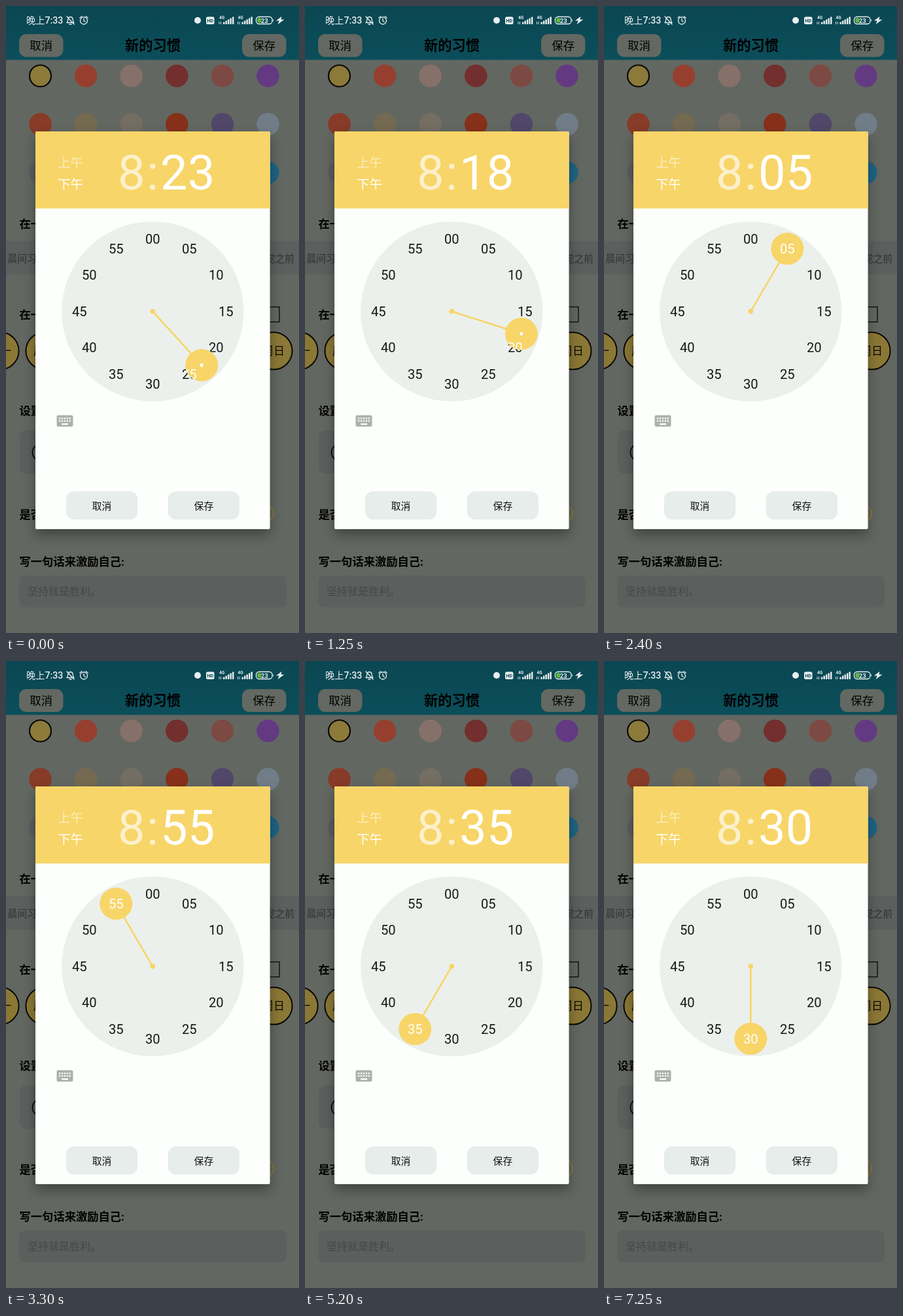
Recreate the animation shown at these times as an HTML page. Size 448 px wide and 960 px high, loop 7300 ms.

```html
<!DOCTYPE html>
<html lang="zh-CN">
<head>
<meta charset="utf-8">
<title>时间选择</title>
<style>
  html, body { margin: 0; width: 100%; height: 100%; overflow: hidden; background: #636761; }
  svg { display: block; width: 448px; height: 960px; }
  text { font-family: Roboto, "Noto Sans CJK SC", "Noto Sans CJK", sans-serif; }
  .mid { text-anchor: middle; }
  .head { font-size: 17.3px; font-weight: 700; }
  .btn { font-size: 17.4px; }
  .action { font-size: 14.8px; font-weight: 500; fill: #111; }
  .chip { font-size: 14.7px; fill: #303330; }
  .day circle { fill: #8b7836; stroke: #080806; stroke-width: 2; }
  .day text { font-size: 17px; fill: #0c0b06; }
  .big { font-size: 74px; fill: #fff; }
  .nums { font-size: 20.2px; text-anchor: middle; }
  .panel { fill: #5b5f5d; }
  #dialog { filter: drop-shadow(0 9px 9px rgba(0, 0, 0, .34)); }
</style>
</head>
<body>
<svg viewBox="0 0 448 960">
  <defs>
    <linearGradient id="bar" x2="0" y2="1">
      <stop stop-color="#0a4752"/>
      <stop offset="1" stop-color="#0b4e5a"/>
    </linearGradient>
    <clipPath id="knobClip"><ellipse class="knob" rx="25" ry="24.6"/></clipPath>
  </defs>

  <rect width="448" height="960" fill="#636761"/>
  <g id="swatches"></g>
  <rect width="448" height="82.5" fill="url(#bar)"/>

  <!-- status bar -->
  <g fill="#e9eff0">
    <text x="31" y="27.2" font-size="14.2" font-weight="500">晚上7:33</text>
    <g fill="none" stroke="#e9eff0" stroke-width="1.3" stroke-linecap="round" stroke-linejoin="round">
      <path d="M93 25.5c2-2 1.5-4 2-6a3.6 3.6 0 0 1 7 0c.5 2 0 4 2 6zM97 28h3M93 16l11 12"/>
      <circle cx="119" cy="22.5" r="5.5"/>
      <path d="M119 19.5v3.2l2.2 1.4M112.8 18.2l3-2.4M125.2 18.2l-3-2.4"/>
    </g>
    <circle cx="293" cy="22" r="5"/>
    <rect x="306" y="16.5" width="12.5" height="11.5" rx="2.5"/>
    <text class="mid" x="312.2" y="25" font-size="7" font-weight="700" fill="#0a4752">HD</text>
    <g id="signals"></g>
    <rect x="382.5" y="16.5" width="24.5" height="11" rx="4.5" fill="none" stroke="#e9eff0" stroke-width="1.3"/>
    <rect x="384.3" y="18.3" width="6" height="7.4" rx="2.5" fill="#62b83e"/>
    <path d="M408 20q2 2 0 4z"/>
    <text class="mid" x="395.2" y="25.6" font-size="9.5" font-weight="700">23</text>
    <path d="M421.5 16l-8.5 6.5h4.8l-2.3 5.5 10-7.2h-5z"/>
  </g>

  <!-- page -->
  <rect x="20" y="43" width="67.5" height="35" rx="11" fill="#636862"/>
  <rect x="361" y="43" width="67.5" height="35" rx="11" fill="#636862"/>
  <text class="btn mid" x="53.7" y="66.6">取消</text>
  <text class="btn mid" x="394.7" y="66.6">保存</text>
  <text class="mid" x="224.5" y="68.2" font-size="21.2" font-weight="700">新的习惯</text>

  <text class="head" x="20.5" y="339.5">在一天的什么时候做</text>
  <rect class="panel" x="-12" y="360" width="96" height="51" rx="9"/>
  <rect class="panel" x="364" y="360" width="96" height="51" rx="9"/>
  <text class="chip" x="2.5" y="391.5">晨间习惯</text>
  <text class="chip" x="441" y="391.5" text-anchor="end">睡觉之前</text>

  <text class="head" x="20.5" y="478.5">在一周的哪几天做</text>
  <rect x="394.5" y="460.7" width="23.5" height="23" fill="none" stroke="#0a0a0a" stroke-width="1.3"/>
  <g class="day" transform="translate(-9 528)"><circle r="28.6"/><text class="mid" y="6.2">周一</text></g>
  <g class="day" transform="translate(59 528)"><circle r="28.6"/><text class="mid" y="6.2">周二</text></g>
  <g class="day" transform="translate(409 528)"><circle r="28.6"/><text class="mid" y="6.2">周日</text></g>

  <text class="head" x="20.5" y="625.5">设置提醒时间</text>
  <rect class="panel" x="21" y="650" width="380" height="66" rx="9"/>
  <circle cx="53.5" cy="683.5" r="13" fill="none" stroke="#0a0a0a" stroke-width="1.8"/>

  <text class="head" x="20.5" y="784.5">是否开启</text>
  <circle cx="395" cy="777" r="14" fill="#6a6858" stroke="#8b7a3f" stroke-width="1.6"/>

  <text class="head" x="20.5" y="856.5">写一句话来激励自己:</text>
  <rect class="panel" x="20.5" y="872" width="408" height="48.5" rx="8"/>
  <text x="33" y="902.3" font-size="16" fill="#454946">坚持就是胜利。</text>

  <!-- dialog -->
  <g id="dialog">
    <rect x="45" y="192" width="358.6" height="609" rx="2" fill="#fcfffc"/>
    <path d="M45 310V194q0-2 2-2h354.600q2 0 2 2v116z" fill="#f7d568"/>
  </g>
  <g fill="#fff" font-size="19.6">
    <text x="79" y="247.3" opacity=".58">上午</text>
    <text x="79" y="280.3">下午</text>
  </g>
  <text class="big mid" x="191.700" y="281" opacity=".66">8</text>
  <text class="big mid" x="224.300" y="281" opacity=".66">:</text>
  <text class="big mid" x="277.700" y="281" id="minute">23</text>

  <ellipse cx="224.300" cy="467.600" rx="139.200" ry="137.700" fill="#ecf0ec"/>
  <g id="darkNums" class="nums" fill="#161816"></g>
  <g fill="#f7d568">
    <line id="hand" x1="224.300" y1="467.600" stroke="#f7d568" stroke-width="2.600"/>
    <circle cx="224.300" cy="467.600" r="3.800"/>
    <ellipse class="knob" rx="25" ry="24.600"/>
  </g>
  <g clip-path="url(#knobClip)"><g id="lightNums" class="nums" fill="#fff"></g></g>
  <circle id="dot" class="knob" r="2.600" fill="#fff"/>

  <rect x="77.500" y="626.500" width="25" height="17.500" rx="2.500" fill="#adb1ad"/>
  <g stroke="#fcfffc" stroke-width="2.300">
    <path d="M81 631.300h18M81 635.300h18" stroke-dasharray="2.300 1.600"/>
    <path d="M85 640.200h10"/>
  </g>

  <rect x="92" y="743.300" width="109.200" height="43" rx="12" fill="#e6edeb"/>
  <rect x="247.700" y="743.300" width="109.200" height="43" rx="12" fill="#e6edeb"/>
  <text class="action mid" x="146.500" y="770.500">取消</text>
  <text class="action mid" x="302.400" y="770.500">保存</text>
</svg>
<script>
  const LOOP = 7300;
  const CX = 224.3, CY = 467.6, RX = 112, RY = 110.8;
  // [time in ms, minute]; values below zero wrap past the hour
  const DRAG = [[0, 23], [250, 23], [1250, 18], [2400, 5], [3300, -5],
                [4150, -15], [5200, -25], [5950, -30], [LOOP, -30]];
  const $ = id => document.getElementById(id);
  const pad = n => String(n).padStart(2, '0');
  const polar = m => {
    const a = m * Math.PI / 30;
    return [CX + RX * Math.sin(a), CY - RY * Math.cos(a)];
  };

  let nums = '';
  for (let m = 0; m < 60; m += 5) {
    const [x, y] = polar(m);
    nums += `<text x="${x.toFixed(1)}" y="${(y + 7.2).toFixed(1)}">${pad(m)}</text>`;
  }
  $('darkNums').innerHTML = $('lightNums').innerHTML = nums;

  const colors = [
    ['#8b7a3a', '#963f2f', '#86716a', '#722f2e', '#7c4a42', '#633a82'],
    ['#873b28', '#746a51', '#736d62', '#86301a', '#51476a', '#707d88'],
    ['#5c5d61', '#6b6b6b', '#6b6b6b', '#6b6b6b', '#6b6b6b', '#1f6484']
  ];
  $('swatches').innerHTML = colors.map((row, r) => row.map((c, i) =>
    `<circle cx="${52.5 + i * 69.6}" cy="${107 + r * 74}" r="${r + i ? 17.3 : 16.5}" fill="${c}"` +
    `${r + i ? '' : ' stroke="#080806" stroke-width="2.2"'}/>`).join('')).join('');

  $('signals').innerHTML = [325, 353.5].map(x => {
    let bars = `<text x="${x + 1}" y="20" font-size="6.5" font-weight="700">4G</text>`;
    for (let i = 0; i < 5; i++) {
      const h = 3.5 + i * 2;
      bars += `<rect x="${x + 7 + i * 3.5}" y="${28 - h}" width="2.4" height="${h}" rx=".8"/>`;
    }
    return bars + `<path d="M${x + 1} 24v4M${x + 3.5} 24v4" stroke="#e9eff0" stroke-width=".9"/>`;
  }).join('');

  function minuteAt(t) {
    const i = DRAG.findIndex(p => p[0] > t);
    const [t0, m0] = DRAG[i - 1], [t1, m1] = DRAG[i];
    const m = Math.round(m0 + (m1 - m0) * (t - t0) / (t1 - t0));
    return (m + 60) % 60;
  }

  const knobs = document.querySelectorAll('.knob');
  let shown = -1;
  function draw(now) {
    const m = minuteAt(now % LOOP);
    if (m !== shown) {
      shown = m;
      const [x, y] = polar(m);
      knobs.forEach(k => { k.setAttribute('cx', x); k.setAttribute('cy', y); });
      $('hand').setAttribute('x2', x);
      $('hand').setAttribute('y2', y);
      $('dot').setAttribute('visibility', m % 5 ? 'visible' : 'hidden');
      $('minute').textContent = pad(m);
    }
  }

  const start = performance.now();
  function tick() {
    draw(performance.now() - start);
    requestAnimationFrame(tick);
  }
  tick();
</script>
</body>
</html>
```
